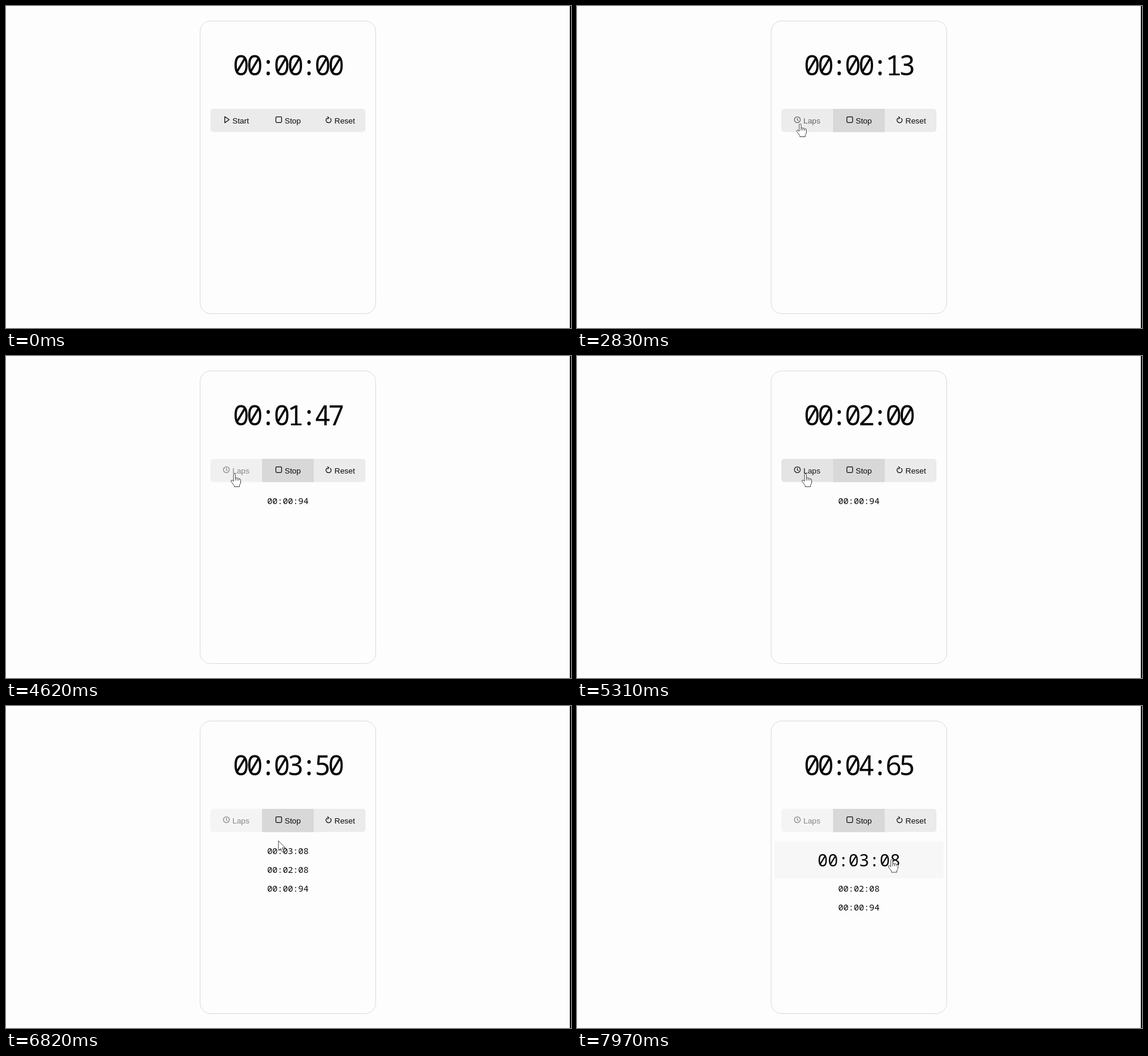
Animation, 962 px wide and 548 px high, one loop 8000 ms. Source, as an HTML page:

```html
<!DOCTYPE html>
<html lang="en">
<head>
<meta charset="utf-8">
<title>Stopwatch</title>
<style>
  html, body { margin: 0; height: 100%; overflow: hidden; background: #fdfdfd; }
  svg { display: block; width: 100vw; height: 100vh; }
  text { fill: #080808; }
  .mono { font-family: "Noto Sans Mono", monospace; text-anchor: middle; }
  .label { font: 13.33px "Liberation Sans", Arial, sans-serif; }
  .icon { fill: none; stroke: #080808; stroke-width: 1.25; stroke-linejoin: round; }
  .cursor { fill: #fff; stroke: #444; stroke-width: 1; stroke-linejoin: round; }
</style>
</head>
<body>
<svg viewBox="0 0 962 548">
  <rect x="960" width="2" height="548"/>
  <rect x="330.5" y="25.5" width="299" height="498" rx="18" fill="none" stroke="#d9d9d9"/>
  <text id="clock" class="mono" x="478.9" y="117.5" font-size="46.5" letter-spacing="-4.75"></text>

  <path d="M436 175H607a5 5 0 0 1 5 5V209.5a5 5 0 0 1-5 5H436z" fill="#ebebeb"/>
  <rect id="running" x="436" y="175" width="88" height="39.5" fill="#d8d8d8"/>
  <g id="first">
    <path id="firstFill" d="M436 175V214.5H353a5 5 0 0 1-5-5V180a5 5 0 0 1 5-5z"/>
    <g id="start">
      <path class="icon" d="M372.5 188.3V198.7L380 193.5z"/>
      <text class="label" x="385.5" y="200">Start</text>
    </g>
    <g id="laps">
      <path class="icon" d="M370.2 193.5a5 5 0 1 0 10 0a5 5 0 1 0-10 0M375.2 190.5V193.7L377 195.2"/>
      <text class="label" x="385.5" y="200">Laps</text>
    </g>
  </g>
  <rect class="icon" x="459.5" y="188.5" width="9.8" height="9.8" rx="1.8"/>
  <text class="label" x="474.5" y="200">Stop</text>
  <path class="icon" d="M552 190.9A4.4 4.4 0 1 1 547 190.5M547.2 188.2L549.8 190.3L547.2 192.4"/>
  <text class="label" x="559.3" y="200">Reset</text>

  <rect id="rowFill" x="336" y="231" width="288" fill="#f7f7f8"/>
  <g id="rows"></g>

  <path id="arrow" class="cursor" d="M0 0V16.5L3.8 13L6.4 19L9 17.9L6.4 12H11.6z"/>
  <path id="hand" class="cursor" d="M-1.7 1.5Q0-.9 1.6 1.5V8Q3.2 6.4 4.6 8.2Q6.4 7 7.5 9Q10 8 10.5 11V16Q10 18 8.5 19.5V22.5H-.5V20.5L-5.8 13.5Q-6 10.5-3.8 11.3L-1.7 13.3zM1.6 8V12M4.6 8.2V12M7.5 9V12"/>
</svg>
<script>
const LOOP = 8000, START = 2700;
const get = id => document.getElementById(id);
const show = (id, on) => get(id).style.display = on ? "" : "none";
const clamp01 = v => Math.min(1, Math.max(0, v));
const smooth = v => v * v * (3 - 2 * v);

// Interpolates [time, value...] keys
function track(keys, t, ease = v => v) {
  let i = 0;
  while (i < keys.length - 2 && t >= keys[i + 1][0]) i++;
  const [a, b] = [keys[i], keys[i + 1]];
  const k = ease(clamp01((t - a[0]) / (b[0] - a[0])));
  return a.slice(1).map((v, n) => v + (b[n + 1] - v) * k);
}

// Elapsed centiseconds
const ticks = [[START, 0], [2830, 13], [3840, 87], [3910, 94], [5310, 200], [6220, 290], [7230, 392], [7970, 465]];
const pointer = [[1620, 16, 318], [2350, 380, 200], [2900, 380, 200], [3250, 389, 200],
  [6560, 389, 200], [7080, 538, 258.5], [7540, 538, 258.5], [7800, 536, 260.5], [LOOP, 536, 260.5]];
const lapTimes = [[3910, 94], [5390, 208], [6400, 308]];
const GROW_FROM = 6850, GROW_MS = 180;

const two = n => String(n).padStart(2, "0");
const format = cs => [Math.floor(cs / 6000), Math.floor(cs / 100) % 60, cs % 100].map(two).join(":");

const rows = lapTimes.map(([, cs]) => {
  const row = document.createElementNS("http://www.w3.org/2000/svg", "text");
  row.setAttribute("class", "mono");
  row.setAttribute("x", 480);
  row.textContent = format(cs);
  return get("rows").appendChild(row);
});

function drawLaps(t) {
  const grow = smooth(clamp01((t - GROW_FROM) / GROW_MS));
  let top = 231;
  for (let i = lapTimes.length - 1; i >= 0; i--) {
    const visible = t >= lapTimes[i][0];
    rows[i].style.display = visible ? "" : "none";
    if (!visible) continue;
    const scale = i === lapTimes.length - 1 ? 1 + grow : 1;
    const size = 14.7 * scale;
    rows[i].setAttribute("font-size", size);
    rows[i].setAttribute("y", top + 16 * scale + size * .355);
    top += 32 * scale;
  }
  get("rowFill").setAttribute("height", 31 * (1 + grow));
  get("rowFill").setAttribute("opacity", grow);
}

function draw(t) {
  const running = t >= START;
  const cs = Math.floor(track(ticks, t)[0] + 1e-6);
  get("clock").textContent = format(cs);
  show("start", !running);
  show("laps", running);
  show("running", running);

  // The Laps button fades once per second
  const pulse = Math.max(.48, .5 + .5 * Math.cos((cs / 100 - .92) * 2 * Math.PI));
  get("first").setAttribute("opacity", running ? pulse : 1);

  const [x, y] = track(pointer, t, smooth);
  const onButton = x > 348 && x < 436 && y > 175 && y < 214;
  const pointing = onButton || (t > 6560 && y > 231);
  get("firstFill").setAttribute("fill", onButton ? "#e3e3e3" : "#ebebeb");
  for (const id of ["arrow", "hand"]) get(id).setAttribute("transform", `translate(${x} ${y})`);
  show("arrow", t >= 1620 && !pointing);
  show("hand", t >= 1620 && pointing);
  drawLaps(t);
}

const origin = performance.now();
function frame() {
  draw((performance.now() - origin) % LOOP);
  requestAnimationFrame(frame);
}
frame();
</script>
</body>
</html>
```
